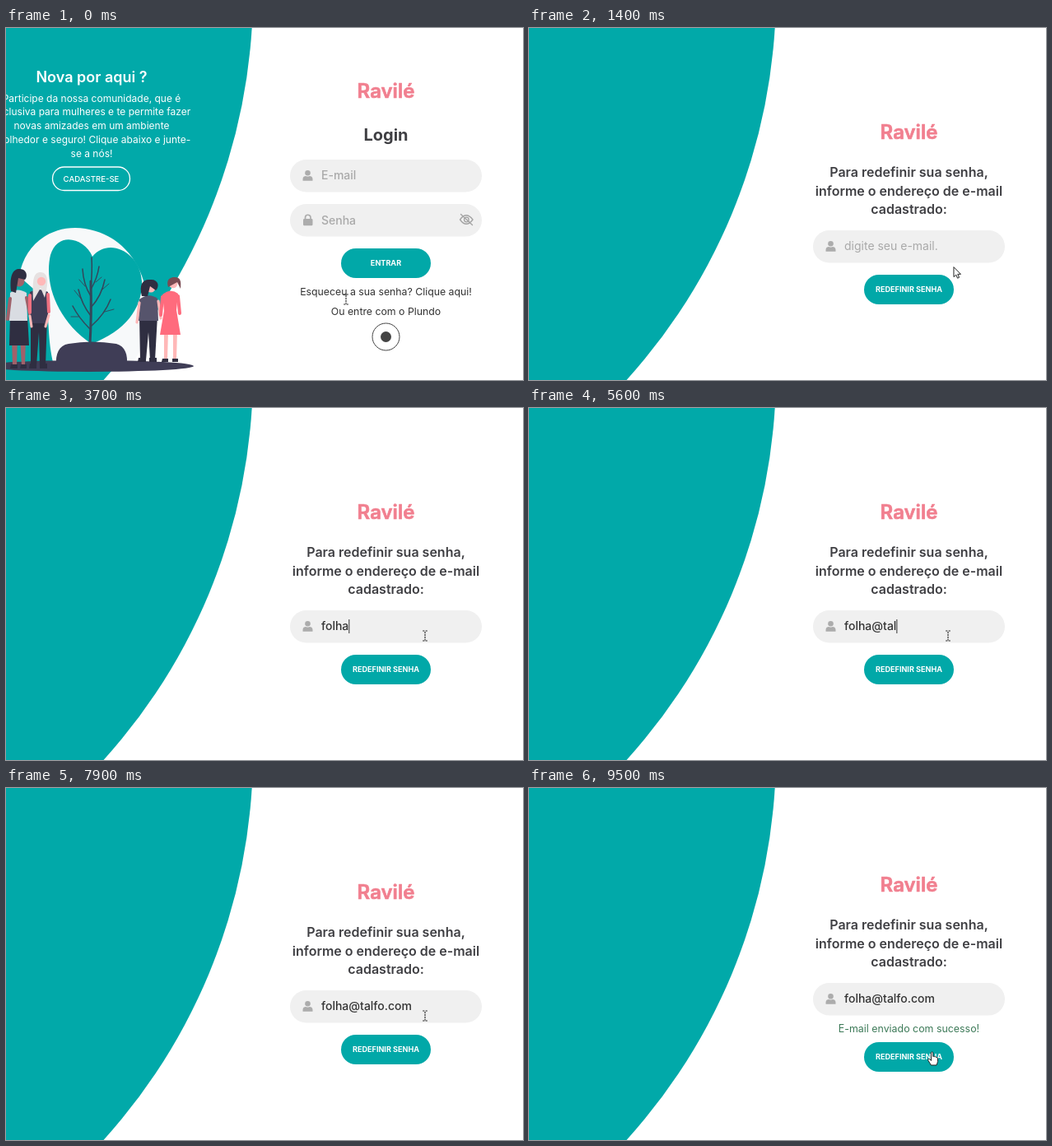
Recreate the animation shown at these times as an HTML page. Size 628 by 428 pixels, loop 10000 ms.

```html
<!DOCTYPE html>
<html lang="pt-BR">
<head>
<meta charset="utf-8">
<title>Redefinir senha</title>
<style>
html, body { margin: 0; width: 100%; height: 100%; overflow: hidden; background: #fff; }
svg { display: block; width: 628px; height: 428px; font-family: Inter, "Open Sans", sans-serif; }
.mid { text-anchor: middle; }
.brand { font-size: 24px; font-weight: 600; fill: #f17f8f; stroke: #f17f8f; stroke-width: .7; stroke-linejoin: round; }
.title { font-size: 16px; font-weight: 600; fill: #3f3f43; }
.field { fill: #f0f0f0; }
.hint { font-size: 14px; fill: #a9a9a9; }
.typed { font-size: 14px; font-weight: 500; fill: #333; }
.btn { fill: #01a8a8; }
.label { font-size: 9.1px; font-weight: 700; fill: #fff; }
.note { font-size: 12.3px; fill: #333; }
.intro { font-size: 12px; fill: #fff; }
.icon { fill: #acacac; }
</style>
</head>
<body>
<svg viewBox="0 0 628 428">
  <defs>
    <radialGradient id="glow">
      <stop offset="0" stop-color="#fba9a6"/>
      <stop offset=".45" stop-color="#f88683"/>
      <stop offset=".85" stop-color="#f57675"/>
      <stop offset="1" stop-color="#f78d8b" stop-opacity=".7"/>
    </radialGradient>
    <g id="user" class="icon">
      <circle cy="-3.2" r="3.3"/>
      <path d="M-6 6.3V4.2C-6 1.6-4 .6-2.2.6Q0 1.6 2.2.6C4 .6 6 1.6 6 4.2V6.3Z"/>
    </g>
  </defs>
  <rect width="628" height="428" fill="#fff"/>
  <circle cx="-402" cy="-43" r="702" fill="#01a9a9"/>

  <g id="login">
    <g class="mid">
      <text x="104" y="66" font-size="18" font-weight="600" fill="#fff">Nova por aqui ?</text>
      <g class="intro">
        <text x="104" y="89.5">Participe da nossa comunidade, que é</text>
        <text x="104" y="106.3">exclusiva para mulheres e te permite fazer</text>
        <text x="104" y="123">novas amizades em um ambiente</text>
        <text x="104" y="139.8">acolhedor e seguro! Clique abaixo e junte-</text>
        <text x="104" y="156.5">se a nós!</text>
      </g>
      <rect x="56.5" y="169" width="94" height="28.5" rx="14.2" fill="none" stroke="#fff" stroke-width="1.3"/>
      <text x="103.5" y="186.8" font-size="9.6" font-weight="500" fill="#fff">CADASTRE-SE</text>
    </g>

    <g id="scene">
      <path fill="#f7f9fa" d="M16 302C22 264 52 243 84 243C140 244 174 292 172 345C171 375 163 398 151 410H58C50 380 53 350 48 330Z"/>
      <path fill="#01a9a9" d="M105 278C96 256 63 246 54 276C46 310 62 356 104 384C146 368 166 340 165 308C163 272 124 254 105 278Z"/>
      <ellipse cx="100" cy="411" rx="128" ry="7" fill="#3f3d56"/>
      <path fill="#3f3d56" d="M61 411C60 396 64 386 76 384Q104 379 134 384C145 387 148 397 147 411Z"/>
      <g fill="none" stroke="#34465a" stroke-width="1.5" stroke-linecap="round">
        <path stroke-width="3" d="M102 384Q104 350 103 308"/>
        <path d="M103 315Q105 296 104 279M103 350Q92 336 88 318M103 340Q116 326 120 306M103 326Q94 312 93 293M103 318Q111 304 113 290M104 362Q120 348 127 330M102 366Q88 352 81 338"/>
        <path stroke-width=".9" d="M91 329L83 319M117 318L125 311M96 314L89 306M109 309L116 303M120 345L131 342M88 351L79 351"/>
      </g>
      <g>
        <path fill="#a0616a" d="M7 377H14L13 411H8ZM17 377H24L23 411H19Z"/>
        <path fill="#2f2e41" d="M5 350H26L28 386H4ZM6 409H14V414H5ZM18 409H25V414H17Z"/>
        <path fill="#d9dce2" d="M5 322Q14 315 25 322L26 356H4Z"/>
        <path fill="none" stroke="#a0616a" stroke-width="4" stroke-linecap="round" d="M5 329L2 354M25 328L29 348"/>
        <circle cx="16" cy="308" r="6.5" fill="#a0616a"/>
        <path fill="#2f2e41" d="M6 320C4 300 9 293 16 293C25 292 27 302 23 306L15 304L12 322Z"/>
      </g>
      <g>
        <path fill="#2f2e41" d="M30 352H50L48 411H41L40 370L37 411H30ZM29 408H37V414H28ZM41 408H50V414H41Z"/>
        <path fill="#3f3d56" d="M29 321Q40 315 51 321L51 359H29Z"/>
        <path fill="none" stroke="#ef7080" stroke-width="4" stroke-linecap="round" d="M29 325L29 346M51 324L52 345"/>
        <path fill="none" stroke="#ffb8b8" stroke-width="3" stroke-linecap="round" d="M29 350L31 363M52 349L48 363"/>
        <path fill="#e6e1e1" d="M33 332C32 306 33 297 42 297C53 297 51 314 47 328L42 316Z"/>
        <circle cx="43" cy="308" r="5.2" fill="#ffb8b8"/>
      </g>
      <g>
        <path fill="#2f2e41" d="M162 350H184L181 404H175L173 370L170 404H163ZM161 401H170V406H160ZM174 401H183V406H174Z"/>
        <path fill="#56546c" d="M162 330Q173 321 184 329L185 356H161Z"/>
        <path fill="none" stroke="#ffb8b8" stroke-width="3.2" stroke-linecap="round" d="M162 334L159 358M185 332L188 353"/>
        <circle cx="176" cy="316" r="5.5" fill="#ffb8b8"/>
        <path fill="#2f2e41" d="M165 326C161 311 167 305 175 306C185 305 187 314 182 319L175 314L172 326Z"/>
      </g>
      <g>
        <path fill="#ffb8b8" d="M192 369H197L196 404H192ZM203 369H208L207 404H203Z"/>
        <path fill="#2f2e41" d="M190 402H197V406H189ZM202 402H209V406H202Z"/>
        <path fill="#ff6b7d" d="M190 324Q200 316 209 323L207 343L212 373H187L192 344Z"/>
        <path fill="none" stroke="#ff6b7d" stroke-width="4" stroke-linecap="round" d="M190 327L188 349M209 326L211 347"/>
        <circle cx="203" cy="311" r="5.3" fill="#ffb8b8"/>
        <path fill="#7a4b52" d="M197 315C194 305 200 303 205 303C212 303 213 308 212 317L208 309Z"/>
      </g>
    </g>

    <text class="brand mid" x="461.5" y="85">Ravilé</text>
    <text class="mid" x="461.5" y="137" font-size="20" font-weight="700" fill="#3f3f43">Login</text>
    <rect class="field" x="345" y="160" width="233" height="39.5" rx="19.7"/>
    <use href="#user" x="366.5" y="179.5"/>
    <text class="hint" x="383" y="184.3" font-weight="500">E-mail</text>
    <rect class="field" x="345" y="214" width="233" height="39.5" rx="19.7"/>
    <rect class="icon" x="361" y="232" width="11.5" height="8.3" rx="1.4"/>
    <path d="M363.5 233V230.5A3.2 3.2 0 0 1 370 230.5V233" fill="none" stroke="#acacac" stroke-width="1.7"/>
    <text class="hint" x="383" y="238.5" font-weight="500">Senha</text>
    <g fill="none" stroke="#a3a3a3" stroke-width="1.3" stroke-linecap="round">
      <path d="M551.5 233Q559 222.500 567 233Q559 243.500 551.500 233ZM552.5 226.500L566.500 239.500"/>
      <circle cx="559.3" cy="233" r="2.8"/>
    </g>
    <rect class="btn" x="407" y="268" width="109" height="36" rx="18"/>
    <text class="label mid" x="461.5" y="289">ENTRAR</text>
    <text class="note mid" x="461.5" y="325">Esqueceu a sua senha? Clique aqui!</text>
    <text class="note mid" x="461.5" y="348.5">Ou entre com o Plundo</text>
    <circle cx="461.5" cy="375.500" r="16.500" fill="#fff" stroke="#444" stroke-width="1"/>
    <circle cx="461.5" cy="375.500" r="6.500" fill="#444"/>
  </g>

  <g id="reset">
    <g id="upper">
      <text class="brand mid" x="461.5" y="135">Ravilé</text>
      <g class="title mid">
        <text x="461.5" y="181">Para redefinir sua senha,</text>
        <text x="461.5" y="203.5">informe o endereço de e-mail</text>
        <text x="461.5" y="226">cadastrado:</text>
      </g>
      <rect class="field" x="345" y="246" width="233" height="39.500" rx="19.700"/>
      <use href="#user" x="366.5" y="265.500"/>
      <text id="hint" class="hint" x="383" y="270">digite seu e-mail.</text>
      <text id="typed" class="typed" x="383" y="270"></text>
      <rect id="caret" y="257" width="1" height="17" fill="#333"/>
    </g>
    <text id="sent" class="mid" x="461.5" y="297" font-size="12.4" fill="#3d7a58">E-mail enviado com sucesso!</text>
    <g id="lower">
      <rect class="btn" x="407" y="300" width="109" height="36" rx="18"/>
      <text class="label mid" x="461.5" y="321">REDEFINIR SENHA</text>
    </g>
  </g>

  <circle id="pulse" fill="url(#glow)"/>
  <g id="cursor">
    <g id="beam" fill="none" stroke="#222" stroke-width="1.1">
      <path d="M-2.800-6H-.6M.6-6H2.800M-2.800 6H-.6M.6 6H2.800"/>
      <path d="M0-5V5.500" stroke-dasharray="2.200 .7"/>
    </g>
    <path id="arrow" d="M0 0V12L2.800 9.500L4.600 13.600L6.600 12.700L4.800 8.700H8.500Z" fill="#fff" stroke="#222" stroke-width="1"/>
    <path id="hand" d="M-2-7.500Q-.8-8.700.2-7.500V-2.500Q1.500-3.300 2.300-2.200Q3.500-2.800 4.200-1.600Q5.800-2 6 0V3.500Q5.500 5.500 4.500 8H-2.200Q-3.500 5.500-5.500 2.500Q-6.300.8-4.800.3Q-3.500.2-2 2.500Z" fill="#fff" stroke="#222" stroke-width="1"/>
  </g>
</svg>
<script>
const LOOP = 10000, STEP = 100;
const PAGE = 700, FOCUS = 1900, SENT = 9000, BLUR = 8800;
const EMAIL = "folha@talfo.com";
const KEYS = [2700, 2900, 3100, 3300, 3700, 4700, 5200, 5400, 5600, 6400, 6600, 6800, 7000, 7200, 7400];

// start, end, destination
const HOME = [413, 330];
const MOVES = [[0, 400, 531, 320], [900, 1700, 509, 277], [8200, 8700, 490.500, 329]];
// start, peak, end, x, y
const CLICKS = [[500, 600, 1000, 531, 320], [1800, 2100, 2500, 502, 269], [8700, 8900, 9300, 485, 321]];

const $ = id => document.getElementById(id);
const clamp = v => Math.max(0, Math.min(1, v));
const ease = v => v * v * (3 - 2 * v);
const show = (id, on) => $(id).setAttribute("display", on ? "inline" : "none");

function set(id, attrs) {
  for (const k in attrs) $(id).setAttribute(k, attrs[k]);
}

function cursorAt(t) {
  let [x, y] = HOME;
  for (const [a, b, tx, ty] of MOVES) {
    const p = ease(clamp((t - a) / (b - a)));
    x += (tx - x) * p;
    y += (ty - y) * p;
  }
  return [x, y];
}

function drawCursor(t) {
  const [x, y] = cursorAt(t);
  const inField = y > 246 && y < 285.5;
  const kind = t < 400 ? "beam"
    : t < PAGE ? "hand"
    : t >= 8200 && y > 300 ? "hand"
    : inField ? "beam" : "arrow";
  for (const id of ["beam", "arrow", "hand"]) show(id, id === kind);
  set("cursor", { transform: `translate(${x} ${y})` });
}

function drawPulse(t) {
  const click = CLICKS.find(([a, , b]) => t > a && t < b);
  show("pulse", click);
  if (!click) return;
  const [a, peak, b, cx, cy] = click;
  const p = t < peak ? (t - a) / (peak - a) : (b - t) / (b - peak);
  set("pulse", { cx, cy, r: 18 * Math.min(1, p * 1.25 - .1), opacity: Math.min(1, .3 + p) });
}

function drawField(t) {
  const n = KEYS.filter(k => k <= t).length;
  const last = n ? KEYS[n - 1] : FOCUS;
  $("typed").textContent = EMAIL.slice(0, n);
  show("hint", !n);
  show("caret", t >= FOCUS && t < BLUR && (t - last) % 1000 < 500);
  set("caret", { x: 383 + (n ? $("typed").getComputedTextLength() : 0) });
}

function render(time) {
  const t = Math.floor((time % LOOP) / STEP) * STEP;
  const shift = t >= SENT ? 9 : 0;
  show("login", t < PAGE);
  show("reset", t >= PAGE);
  show("sent", shift);
  set("upper", { transform: `translate(0 ${-shift})` });
  set("lower", { transform: `translate(0 ${shift})` });
  drawField(t);
  drawPulse(t);
  drawCursor(t);
}

const start = performance.now();
function tick() {
  render(performance.now() - start);
  requestAnimationFrame(tick);
}
tick();
</script>
</body>
</html>
```
